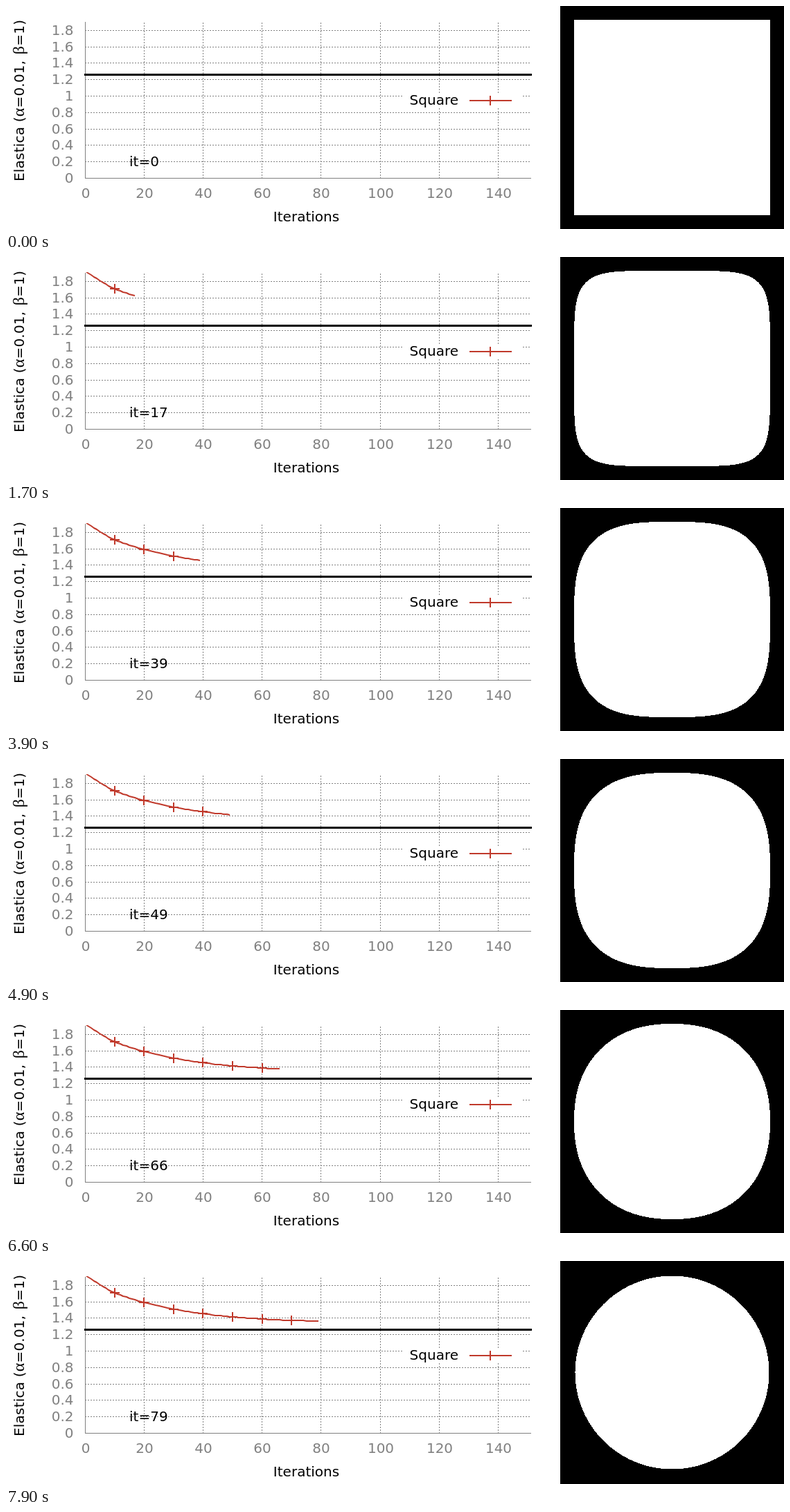
An HTML page for the animation above (8 s loop, 1123x323 px).

```html
<!DOCTYPE html>
<html lang="en">
<head>
<meta charset="utf-8">
<title>Elastica flow</title>
<style>
  html, body { margin: 0; width: 100%; height: 100%; overflow: hidden; background: #fff; }
  svg { display: block; width: 1123px; height: 323px; }
  text { font: 20px "DejaVu Sans", sans-serif; white-space: pre; }
  .tick { fill: #808080; }
  .label { letter-spacing: 0.2px; }
  .greek { font-family: "Liberation Serif", serif; font-size: 24px; }
  .grid { stroke: #808080; stroke-dasharray: 2 2; }
  .axis { stroke: #808080; fill: none; }
  .red { stroke: #c0392b; stroke-width: 2; fill: none; stroke-linejoin: round; }
  .crisp { shape-rendering: crispEdges; }
</style>
</head>
<body>
<svg viewBox="0 0 1123 323">
  <clipPath id="plot"><rect x="113" y="22" width="646" height="228"/></clipPath>
  <g id="grid" class="crisp"></g>
  <rect x="574" y="126" width="170" height="21" fill="#fff"/>
  <path class="axis crisp" d="M114.5 23V249.5H758"/>
  <g id="ticks"></g>
  <text x="433.5" y="312" text-anchor="middle">Iterations</text>
  <g transform="translate(26 254) rotate(-90)">
    <text class="label">Elastica (<tspan class="greek">α</tspan>=0.01, <tspan class="greek" dx="2">β</tspan>=1)</text>
  </g>
  <text x="653" y="143" text-anchor="end">Square</text>
  <path class="red" d="M669 137H730M699 130V144"/>
  <path id="curve" class="red" clip-path="url(#plot)"/>
  <path id="marks" class="red"/>
  <path d="M113 99.5H759" stroke="#000" stroke-width="3"/>
  <text id="count" x="178" y="232"></text>
  <rect x="800" width="323" height="323"/>
  <path id="shape" class="crisp" fill="#fff"/>
</svg>
<script>
const STEP = 100, STEPS = 80;
const $ = id => document.getElementById(id);
const px = it => 114 + 4.262 * it;
const py = v => 248.9 - 118.9 * v;

function add(parent, tag, attrs, text = "") {
  const el = document.createElementNS("http://www.w3.org/2000/svg", tag);
  for (const k in attrs) el.setAttribute(k, attrs[k]);
  el.textContent = text;
  parent.append(el);
}

// Axes
for (let i = 0; i < 10; i++) {
  const y = Math.round(py(i / 5)) + 0.5;
  if (i) add($("grid"), "path", { class: "grid", d: `M114 ${y}H758` });
  add($("ticks"), "text", { class: "tick", x: 97.5, y: y + 6.5, "text-anchor": "end" }, +(i / 5).toFixed(1));
}
for (let it = 0; it <= 140; it += 20) {
  const x = Math.floor(px(it)) + 0.5;
  if (it) add($("grid"), "path", { class: "grid", d: `M${x} 250V23` });
  add($("ticks"), "text", { class: "tick", x: x + 0.5, y: 278, "text-anchor": "middle" }, it);
}

// Energy curve height, one knot every five iterations from -5
const heights = [3, 19.5, 34.2, 45.8, 53.7, 60, 65.4, 69.5, 73.3, 76.3, 79, 81, 82.6, 84, 85.2, 86, 86.6, 87.2, 87.7];

function energyY(it) {
  const i = Math.floor(it / 5), u = it / 5 - i;
  const [a, b, c, d] = heights.slice(i, i + 4);
  return b + u / 2 * (c - a + u * (2 * a - 5 * b + 4 * c - d + u * (3 * (b - c) + d - a)));
}

// How far the corner has receded along the diagonal
const cuts = [[0, 0], [5, 0.043], [10, 0.078], [17, 0.12], [27, 0.159], [39, 0.198], [58, 0.246], [66, 0.265], [79, 0.2929]];

function cutAt(it) {
  const k = Math.max(1, cuts.findIndex(c => c[0] >= it));
  const [a, p] = cuts[k - 1], [b, q] = cuts[k];
  return p + (q - p) * (it - a) / (b - a);
}

// Superellipse through the receding corner
function shapePath(it) {
  if (!it) return "M820 20H1103V303H820Z";
  const n = -Math.LN2 / Math.log(1 - cutAt(it));
  const r = 141.5 - 1.5 * Math.max(0, (it - 66) / 13);
  const pow = v => Math.sign(v) * Math.abs(v) ** (2 / n) * r;
  let d = "";
  for (let i = 0; i < 360; i++) {
    const a = i * Math.PI / 180;
    d += `${i ? "L" : "M"}${(961.5 + pow(Math.cos(a))).toFixed(2)} ${(161.5 + pow(Math.sin(a))).toFixed(2)}`;
  }
  return d + "Z";
}

// The plotted points snap to whole pixels
function draw(it) {
  let line = "", marks = "";
  for (let i = 0; it && i <= it; i++) {
    const x = Math.round(px(i)), y = Math.round(energyY(i));
    line += `${i ? "L" : "M"}${x} ${y}`;
    if (i && i % 10 === 0) marks += `M${x - 7} ${y}h14M${x} ${y - 7}v14`;
  }
  $("curve").setAttribute("d", line);
  $("marks").setAttribute("d", marks);
  $("count").textContent = "it=" + it;
  $("shape").setAttribute("d", shapePath(it));
}

let shown = -1;
function tick() {
  const it = Math.floor(performance.now() / STEP) % STEPS;
  if (it !== shown) draw(shown = it);
  requestAnimationFrame(tick);
}
tick();
</script>
</body>
</html>
```
